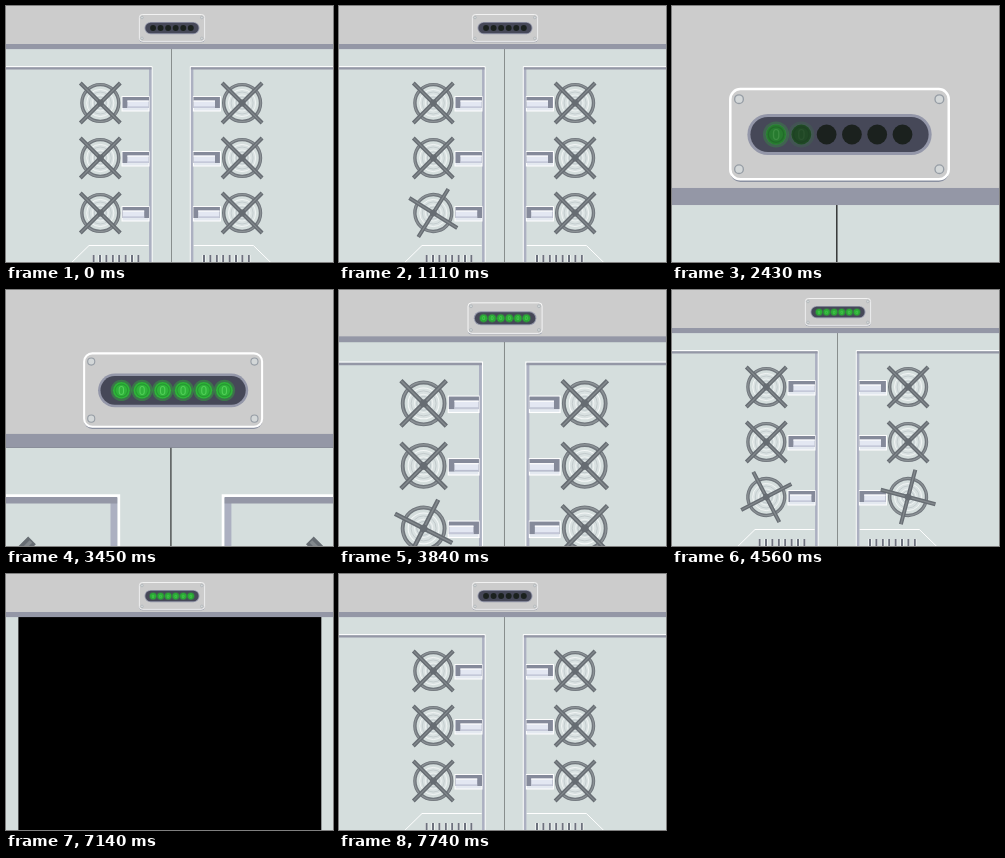
These frames come from a looping animation (327x256 px, 8100 ms). An HTML page:

```html
<!DOCTYPE html>
<html lang="en">
<head>
<meta charset="utf-8">
<title>Vault doors</title>
<style>
  html, body { margin: 0; width: 100%; height: 100%; overflow: hidden; background: #ccc; }
  svg { display: block; width: 100vw; height: 100vh; }
  .led text { font: 4.4px "Roboto", sans-serif; text-anchor: middle; fill: #52cf58; }
</style>
</head>
<body>
<svg id="stage" viewBox="0 0 327 256" preserveAspectRatio="none">
  <defs>
    <g id="base" fill="none">
      <circle r="13.6" fill="#d9e1e1" stroke="#f4f7f7" stroke-width=".9"/>
      <circle r="11" stroke="#bcc4c7" stroke-width=".7"/>
      <circle r="8" stroke="#eef2f2" stroke-width=".9"/>
      <circle r="6" stroke="#b4bcc0" stroke-width=".7"/>
    </g>
    <g id="wheel" fill="none">
      <circle r="18.4" stroke="#70767c" stroke-width="3.4"/>
      <circle r="18.6" stroke="#8c9296" stroke-width="1.2"/>
      <path d="M-20-20 20 20M-20 20 20-20" stroke="#676d73" stroke-width="4"/>
      <path d="M-19.6-19.6 19.6 19.6M-19.6 19.6 19.6-19.6" stroke="#83898d" stroke-width="1.3"/>
      <circle r="3.4" fill="#666c72"/>
    </g>
    <g id="slot">
      <rect x="116" y="-6.4" width="27" height="14.4" fill="#e4e9f0" stroke="#fff"/>
      <path d="M116.5-6h26.5v11h-26.5z" fill="#858a9a"/>
    </g>
    <g id="bolt">
      <rect x="116.8" y="-2.5" width="21.4" height="7.5" fill="#e3e7f2"/>
      <path d="M116.8 4.1h21.4" stroke="#b9bdce" stroke-width="1.2"/>
      <path d="M116.8-1.9h21.4" stroke="#fff" stroke-width="1"/>
    </g>
    <g id="panel">
      <rect x="-5" y="43" width="170.03" height="220" fill="#d5dedd"/>
      <path d="M-5 60.6H146.1V262" fill="none" stroke="#fff"/>
      <path d="M144.3 61.5V262" stroke="#acb0c1" stroke-width="2.5"/>
      <path d="M-5 62.3H145.5" stroke="#9497a6" stroke-width="2.3"/>
      <path d="M60 262 83 239.5H142.6" fill="none" stroke="#fff"/>
      <path d="M86 252.5H134" stroke="#fff" stroke-width="7" stroke-dasharray="3.2 3.2"/>
      <path d="M86.6 253H134" stroke="#6d727e" stroke-width="8" stroke-dasharray="2 4.4"/>
    </g>
  </defs>
  <rect y="40" width="327" height="220"/>
  <g id="left"></g>
  <g id="right"></g>
  <rect x="-5" y="-20" width="340" height="58" fill="#ccc"/>
  <rect x="-5" y="38" width="340" height="5.1" fill="#9497a6"/>
  <rect x="133.4" y="9.2" width="65.2" height="27" rx="3" fill="#8a90a0"/>
  <rect x="133.4" y="8.5" width="65.2" height="26.9" rx="3" fill="#ccc" stroke="#fff" stroke-width=".75"/>
  <g id="screws" fill="#d3d7d8" stroke="#969da5" stroke-width=".4"></g>
  <rect x="138.5" y="15.9" width="55" height="12.3" rx="6.15" fill="#9497a9"/>
  <rect x="139.4" y="16.8" width="53.2" height="10.5" rx="5.25" fill="#464858"/>
  <g id="leds"></g>
</svg>
<script>
const LOOP = 8100, ROWS = [97, 152, 207], AXIS = 330.4;
const $ = id => document.getElementById(id);
const stage = $('stage');

const clamp = v => Math.min(1, Math.max(0, v));
const span = (t, start, length) => clamp((t - start) / length);
const outQuad = p => 1 - (1 - p) ** 2;
const inOutQuad = p => p < .5 ? 2 * p * p : 1 - 2 * (1 - p) ** 2;
const backIn = q => q * q * (2.70158 * q - 1.70158);
const inOutBack = p => p < .5 ? backIn(2 * p) / 2 : 1 - backIn(2 - 2 * p) / 2;
const mix = (a, b, k) => a + (b - a) * k;

const row = y => `<g transform="translate(0 ${y})"><use href="#slot"/><use href="#bolt" class="bolt"/></g>
  <g transform="translate(94.3 ${y})"><use href="#base"/><use href="#wheel" class="wheel"/></g>`;

function buildDoor(el) {
  el.innerHTML = '<use href="#panel"/>' + ROWS.map(row).join('');
  return { el, wheels: el.querySelectorAll('.wheel'), bolts: el.querySelectorAll('.bolt') };
}
const left = buildDoor($('left')), right = buildDoor($('right'));

$('screws').innerHTML = [11.5, 32.4].map(y =>
  [136, 195.8].map(x => `<circle cx="${x}" cy="${y}" r="1.3"/>`).join('')).join('');

$('leds').innerHTML = Array.from({ length: 6 }, (_, i) =>
  `<g transform="translate(${147.05 + i * 7.55} 22.05)"><circle r="2.95" fill="#1b211e"/>
   <g class="led"><circle r="3.9" fill="#2fb33a" opacity=".4"/><circle r="3.1" fill="#2fb33a"/>
   <circle r="2.3" fill="none" stroke="#279a32" stroke-width=".4"/><text y="1.55">0</text></g></g>`).join('');
const leds = document.querySelectorAll('.led');

const turn = (wheel, deg) => wheel.setAttribute('transform', `rotate(${deg})`);
const slide = (el, x, flip = '') => el.setAttribute('transform', `translate(${x} 0) ${flip}`);

function draw(t) {
  // camera
  const zoom = inOutQuad(span(t, 1464, 800)) - inOutQuad(span(t, 3275, 800));
  stage.setAttribute('viewBox', [116 * zoom, -16.3 * zoom, mix(327, 97.6, zoom), mix(256, 76.4, zoom)].join(' '));

  // wheels
  left.wheels.forEach((w, i) => {
    const nudge = -20 * Math.sin(Math.PI * inOutQuad(span(t, 150 + i * 390, 540)));
    const spin = i === 2 ? 360 * inOutBack(span(t, 3590, 1200)) : 0;
    turn(w, nudge + spin);
  });
  turn(right.wheels[2], 360 * inOutBack(span(t, 3850, 1200)));

  // bolts, reset while the doors are out of view
  const hidden = t > 6500;
  [left, right].forEach((door, side) => door.bolts.forEach((b, i) => {
    const moved = i < 2 ? 1 : hidden ? 0 : inOutQuad(span(t, 4400 + side * 300, 450));
    slide(b, 4.6 * moved);
  }));

  // doors
  const closing = inOutQuad(span(t, 7120, 620));
  const open = inOutQuad(span(t, 5304, 716)) - closing;
  slide(left.el, -153 * open);
  slide(right.el, AXIS + 150.3 * open, 'scale(-1 1)');

  // lights
  leds.forEach((led, i) => led.setAttribute('opacity', outQuad(span(t, 2270 + i * 100, 420)) * (1 - closing)));
}

const began = performance.now();
function tick() {
  draw((performance.now() - began) % LOOP);
  requestAnimationFrame(tick);
}
tick();
</script>
</body>
</html>
```
